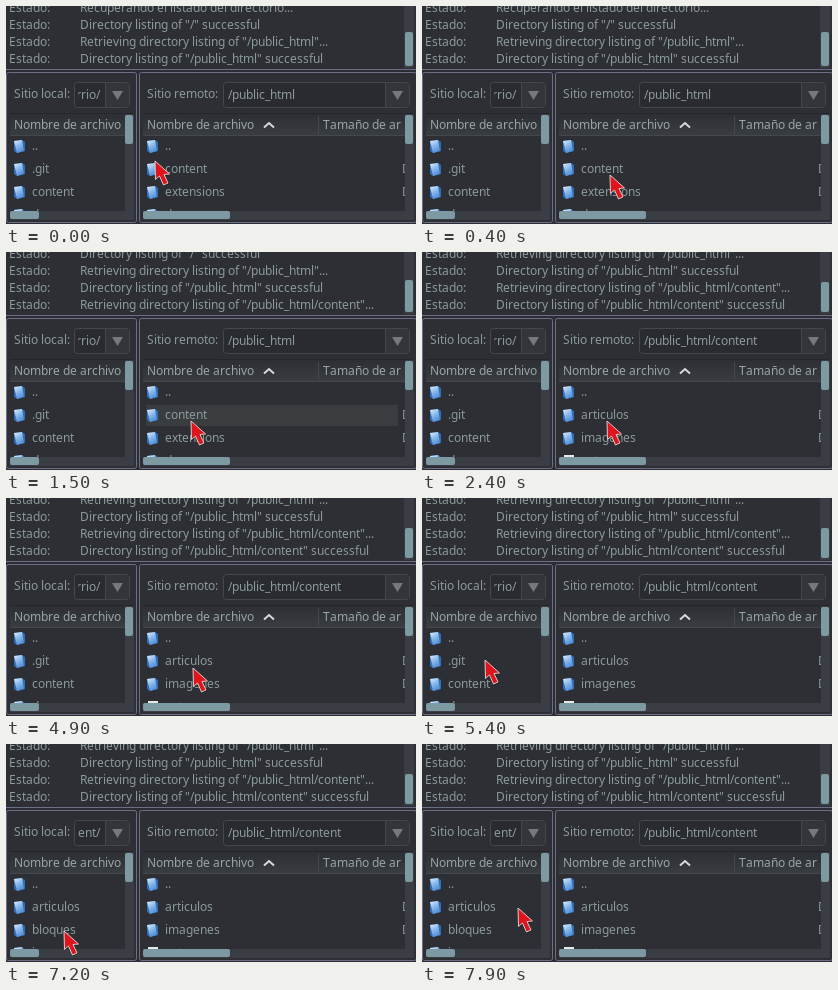
An HTML page with a canvas that plays this animation: 410 by 218 pixels, repeating every 8000 ms.

```html
<!DOCTYPE html>
<html lang="es">
<head>
<meta charset="utf-8">
<title>Dos paneles de archivos</title>
<style>
html, body { margin: 0; width: 410px; height: 218px; overflow: hidden; background: #2b2d33; }
canvas { display: block; }
</style>
</head>
<body>
<canvas id="stage" width="410" height="218"></canvas>
<script>
const g = document.getElementById('stage').getContext('2d');
const LOOP = 8000;
const C = {
  window: '#2b2d33', pane: '#2d2f35', border: '#6d6f88', text: '#8b9a9b', head: '#98a5a7',
  line: '#44474d', edge: '#24262b', track: '#3a3d43', thumb: '#7d99a1', field: '#292b30',
  button: '#33353a', hover: '#3a3d40'
};

const log = [
  'Recuperando el listado del directorio...',
  'Directory listing of "/" successful',
  'Retrieving directory listing of "/public_html"...',
  'Directory listing of "/public_html" successful',
  'Retrieving directory listing of "/public_html/content"...',
  'Directory listing of "/public_html/content" successful'
];

// pointer: [time, x, y]; moves advance in 100 ms steps
const path = [
  [0, 148, 154], [100, 148, 154], [400, 187, 168], [500, 184, 168],
  [4800, 184, 168], [4900, 186, 169], [5000, 186, 169], [5400, 62, 161],
  [5500, 62, 161], [5600, 61, 160], [5700, 61, 160], [6000, 57, 185],
  [6400, 57, 185], [6500, 57, 186], [7500, 57, 186], [7900, 95, 163], [8000, 95, 163]
];

function pointer(t) {
  t = Math.floor(t / 100) * 100;
  const i = Math.max(1, path.findIndex(p => p[0] >= t));
  const a = path[i - 1], b = path[i];
  const k = (t - a[0]) / (b[0] - a[0]);
  return [a[1] + (b[1] - a[1]) * k, a[2] + (b[2] - a[2]) * k];
}

function rect(x, y, w, h, fill) {
  g.fillStyle = fill;
  g.fillRect(x, y, w, h);
}

function round(x, y, w, h, r, fill, stroke) {
  g.beginPath();
  g.roundRect(x, y, w, h, r);
  if (fill) { g.fillStyle = fill; g.fill(); }
  if (stroke) { g.strokeStyle = stroke; g.lineWidth = 1; g.stroke(); }
}

function poly(points, fill) {
  g.beginPath();
  points.forEach(p => g.lineTo(p[0], p[1]));
  g.closePath();
  g.fillStyle = fill;
  g.fill();
}

// glyphs advance by whole pixels, like hinted desktop text
function text(s, x, y, color = C.text) {
  g.font = '12px "Noto Sans", "Open Sans", sans-serif';
  g.fillStyle = color;
  for (const ch of s) {
    g.fillText(ch, x, y);
    x += Math.round(g.measureText(ch).width);
  }
}

function clip(x, y, w, h, draw) {
  g.save();
  g.beginPath();
  g.rect(x, y, w, h);
  g.clip();
  draw();
  g.restore();
}

function fade(y, h, top, bottom) {
  const f = g.createLinearGradient(0, y, 0, y + h);
  f.addColorStop(0, top);
  f.addColorStop(1, bottom);
  return f;
}

function thumb(x, y, w, h) {
  round(x, y, w, h, 2, C.thumb);
}

function folder(x, y) {
  poly([[x, y + 1], [x + 8, y], [x + 11, y + 2], [x + 11, y + 11], [x + 3, y + 13], [x, y + 11]], '#2f6fb8');
  const blue = g.createLinearGradient(x, y, x + 8, y + 13);
  blue.addColorStop(0, '#e2effc');
  blue.addColorStop(0.5, '#86b6ea');
  blue.addColorStop(1, '#4585d0');
  poly([[x, y + 1], [x + 8, y], [x + 10, y + 11], [x + 3, y + 13]], blue);
}

function file(x, y) {
  rect(x + 1, y, 10, 13, '#e6e8ea');
}

function rows(x, names, lastIsFile) {
  names.forEach((name, i) => {
    const y = 144 + i * 23;
    (lastIsFile && i === 3 ? file : folder)(x, y - 10);
    text(name, x + 18, y);
  });
}

function combo(x, w, label, dx) {
  round(x + 0.5, 76.5, w, 25, 3, C.field, C.line);
  rect(x + w - 23, 77, 23, 24, C.button);
  rect(x + w - 24, 77, 1, 24, C.line);
  poly([[x + w - 17, 85], [x + w - 6, 85], [x + w - 11.5, 94]], '#74797c');
  clip(x + 4, 77, w - 28, 24, () => text(label, x + dx, 93));
}

function drawLog(t) {
  const first = t < 1500 ? 0 : t < 2400 ? 1 : 2;
  round(-3.5, -4.5, 420, 68, 2, C.pane, C.border);
  for (let i = 0; i < 4; i++) {
    const y = 6 + i * 17;
    text('Estado:', 3, y);
    text(log[first + i], 74, y);
  }
  rect(398, 0, 10, 62, C.track);
  thumb(399, 26 + first * 2, 8, 34 - first * 2);
}

function pane(x, w, label) {
  round(x + 0.5, 66.5, w, 150, 2, C.pane, C.border);
  text(label, x + 8, 92);
  rect(x + 4, 108, w - 7, 21, fade(108, 21, '#2d2f34', '#393c41'));
  rect(x + 4, 107, w - 7, 1, C.edge);
  rect(x + 4, 129, w - 7, 1, C.line);
}

function bars(x, w, hw) {
  rect(x + 4, 205, w - 7, 9, C.track);
  rect(x + w - 11, 108, 9, 106, C.track);
  thumb(x + w - 11, 109, 8, 29);
  thumb(x + 4, 205, hw, 8);
}

function drawLocal(t) {
  const inside = t >= 7200;
  pane(0, 130, 'Sitio local:');
  combo(68, 55, inside ? 'ent/' : 'rrio/', inside ? 4 : 2);
  clip(4, 108, 114, 97, () => {
    text('Nombre de archivo', 8, 123, C.head);
    if (t >= 6500 && !inside) rect(8, 178, 64, 16, C.hover);
    rows(8, inside ? ['..', 'articulos', 'bloques', 'imagenes'] : ['..', '.git', 'content', 'docs']);
  });
  bars(0, 130, 29);
}

function drawRemote(t) {
  const inside = t >= 2400;
  pane(133, 277, 'Sitio remoto:');
  combo(217, 186, inside ? '/public_html/content' : '/public_html', 5);
  clip(137, 108, 262, 97, () => {
    text('Nombre de archivo', 141, 123, C.head);
    g.beginPath();
    g.moveTo(258, 121.5);
    g.lineTo(263, 117);
    g.lineTo(268, 121.5);
    g.strokeStyle = '#d4dadb';
    g.lineWidth = 2;
    g.stroke();
    rect(312, 110, 1, 18, C.line);
    clip(313, 108, 82, 21, () => text('Tamaño de archivo', 317, 123, C.head));
    if (t >= 1300 && !inside) rect(140, 153, 252, 21, C.hover);
    rows(141, inside ? ['..', 'articulos', 'imagenes', 'notas'] : ['..', 'content', 'extensions', 'docs'], inside);
    for (let i = 1; i < 3; i++) text('D', 396, 144 + i * 23);
  });
  bars(133, 277, 87);
}

function drawPointer(x, y) {
  g.save();
  g.translate(x, y);
  const arrow = [[1, 1], [1.5, 19.5], [5.5, 16], [9.5, 25], [14, 23], [10, 14.5], [15.5, 14]];
  poly(arrow.map(p => [p[0] + 1, p[1] + 1]), 'rgba(0,0,0,.35)');
  poly(arrow, '#e0141c');
  g.strokeStyle = '#d9cccc';
  g.lineWidth = 1;
  g.lineJoin = 'round';
  g.stroke();
  g.restore();
}

function draw(t) {
  rect(0, 0, 410, 218, C.window);
  drawLog(t);
  drawLocal(t);
  drawRemote(t);
  drawPointer(...pointer(t));
}

const start = performance.now();
function tick() {
  draw((performance.now() - start) % LOOP);
  requestAnimationFrame(tick);
}
tick();
</script>
</body>
</html>
```
